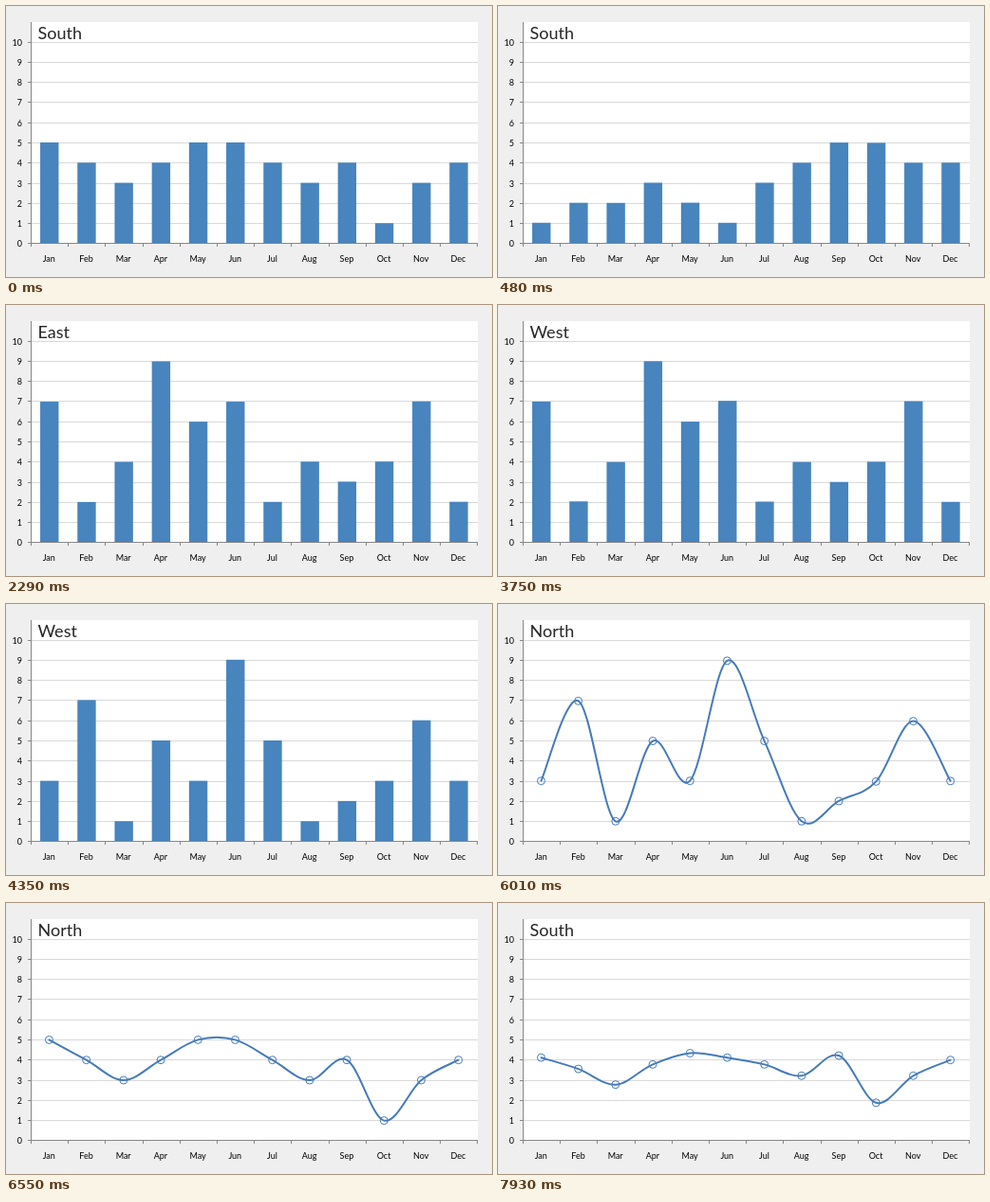
Recreate the animation shown at these times as an HTML page with a canvas. Size 512x286 px, loop 7.99 s.

```html
<!DOCTYPE html>
<html lang="en">
<head>
<meta charset="utf-8">
<title>Monthly chart by region</title>
<style>
  html, body { margin: 0; width: 100%; height: 100%; overflow: hidden; background: #efefef; }
  canvas { display: block; }
</style>
</head>
<body>
<canvas id="chart" width="512" height="286"></canvas>
<script>
const ctx = document.getElementById('chart').getContext('2d');
const LOOP = 7990, STEP = 60, LINE_AT = 4750;
const LEFT = 26, RIGHT = 497, TOP = 17, BASE = 250.5;
const UNIT = 21.3, SLOT = 39.2, BAR = 19.4;
const MONTHS = 'Jan Feb Mar Apr May Jun Jul Aug Sep Oct Nov Dec'.split(' ');

const DATA = {
  North: [5, 4, 3, 4, 5, 5, 4, 3, 4, 1, 3, 4],
  South: [1, 2, 2, 3, 2, 1, 3, 4, 5, 5, 4, 4],
  East: [7, 2, 4, 9, 6, 7, 2, 4, 3, 4, 7, 2],
  West: [3, 7, 1, 5, 3, 9, 5, 1, 2, 3, 6, 3]
};

// title: when the heading switches; start: first moving step
const MOVES = [
  { title: 0, start: 60, steps: 9, from: 'North', to: 'South' },
  { title: 1870, start: 1870, steps: 9, from: 'South', to: 'East' },
  { title: 3750, start: 3750, steps: 11, from: 'East', to: 'West' },
  { title: 6010, start: 6010, steps: 10, from: 'West', to: 'North' },
  { title: 7750, start: 7750, steps: 11, from: 'North', to: 'South' }
];

const xAt = i => 45.75 + SLOT * i;
const yAt = v => BASE - UNIT * v;
const ease = t => t < 0.5 ? 4 * t ** 3 : 1 - 4 * (1 - t) ** 3;

function progress(move, time) {
  const k = Math.floor((time - move.start) / STEP) + 1;
  if (k <= 0) return 0;
  return ease(Math.min(1, (k + 0.3) / (move.steps + 0.3)));
}

function segment(x1, y1, x2, y2) {
  ctx.beginPath();
  ctx.moveTo(x1, y1);
  ctx.lineTo(x2, y2);
  ctx.stroke();
}

function text(str, x, y, size, align, color) {
  ctx.font = size + 'px Lato, Carlito, sans-serif';
  ctx.textAlign = align;
  ctx.fillStyle = color;
  ctx.fillText(str, x, y);
}

function drawGrid() {
  ctx.fillStyle = '#efefef';
  ctx.fillRect(0, 0, 512, 286);
  ctx.fillStyle = '#fff';
  ctx.fillRect(LEFT, TOP, RIGHT - LEFT, BASE - TOP);
  ctx.lineWidth = 1;
  ctx.strokeStyle = '#d9d9d9';
  for (let v = 1; v <= 10; v++) {
    const y = Math.round(yAt(v)) + 0.5;
    segment(LEFT, y, RIGHT, y);
  }
}

function drawAxes() {
  ctx.lineWidth = 1;
  ctx.strokeStyle = '#868686';
  segment(LEFT + 0.5, TOP, LEFT + 0.5, 254);
  segment(LEFT - 3, BASE, RIGHT, BASE);
  for (let v = 0; v <= 10; v++) {
    const y = v ? Math.round(yAt(v)) + 0.5 : BASE;
    segment(LEFT - 3, y, LEFT, y);
    text(v, 17, y + 3.3, 9, 'right', '#000');
  }
  MONTHS.forEach((name, i) => {
    const x = Math.round(LEFT + SLOT * (i + 1)) + 0.5;
    segment(x, BASE, x, 254);
    text(name, xAt(i) - 0.5, 270, 9, 'center', '#000');
  });
}

function drawBars(values) {
  ctx.fillStyle = '#4884bd';
  values.forEach((v, i) => {
    const y = yAt(v);
    ctx.fillRect(xAt(i) - BAR / 2, y, BAR, BASE - y);
  });
}

function drawLine(values) {
  const pts = values.map((v, i) => [xAt(i) - 0.3, yAt(v) + 0.4]);
  const at = i => pts[Math.max(0, Math.min(pts.length - 1, i))];
  ctx.strokeStyle = '#457ab9';
  ctx.lineWidth = 2;
  ctx.lineJoin = ctx.lineCap = 'round';
  ctx.beginPath();
  ctx.moveTo(...pts[0]);
  for (let i = 0; i < pts.length - 1; i++) {
    const [a, b, c, d] = [at(i - 1), at(i), at(i + 1), at(i + 2)];
    ctx.bezierCurveTo(
      b[0] + (c[0] - a[0]) / 6, b[1] + (c[1] - a[1]) / 6,
      c[0] - (d[0] - b[0]) / 6, c[1] - (d[1] - b[1]) / 6,
      c[0], c[1]
    );
  }
  ctx.stroke();
  ctx.lineCap = 'butt';
  ctx.lineWidth = 1;
  for (const [x, y] of pts) {
    ctx.beginPath();
    ctx.arc(x, y, 4, 0, Math.PI * 2);
    ctx.stroke();
  }
}

function draw(time) {
  const move = MOVES.filter(m => m.title <= time).pop();
  const p = progress(move, time);
  const goal = DATA[move.to];
  const values = DATA[move.from].map((v, i) => v + (goal[i] - v) * p);
  drawGrid();
  if (time < LINE_AT) drawBars(values);
  drawAxes();
  if (time >= LINE_AT) drawLine(values);
  text(move.to, 33.5, 35, 18, 'left', '#262626');
}

const begin = performance.now();
function tick() {
  draw((performance.now() - begin) % LOOP);
  requestAnimationFrame(tick);
}
tick();
</script>
</body>
</html>
```
